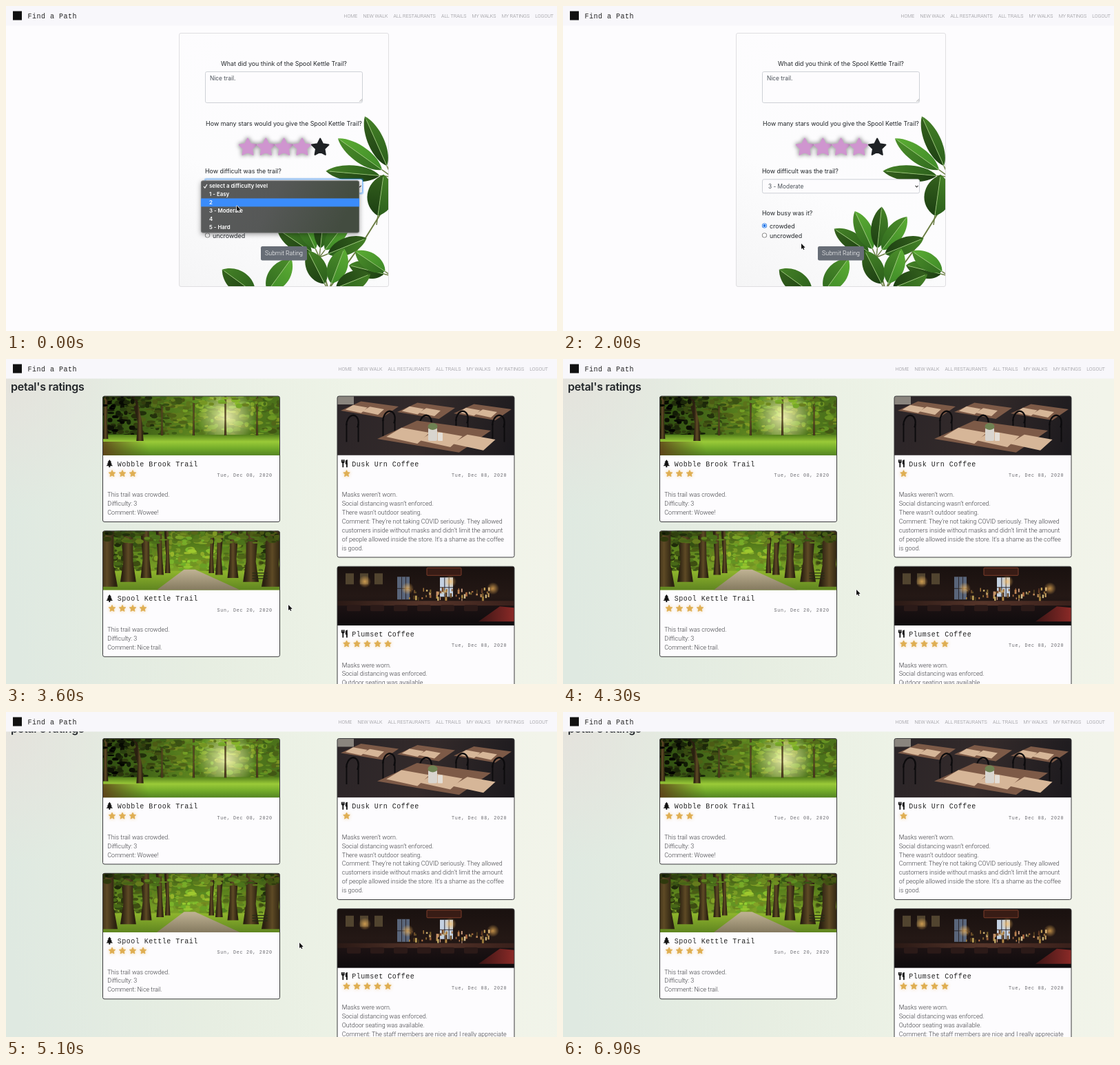
Animation of 800 by 472 pixels, one loop 7 s. Source, as an HTML page with a canvas:

```html
<!DOCTYPE html>
<html lang="en">
<head>
<meta charset="utf-8">
<title>Trail ratings</title>
<style>
html, body { margin: 0; width: 100%; height: 100%; overflow: hidden; background: #fdfcfe; }
canvas { display: block; width: 800px; height: 472px; }
</style>
</head>
<body>
<canvas id="stage"></canvas>
<script>
const W = 800, H = 472, LOOP = 7000, STEP = 100, TAU = Math.PI * 2;
const canvas = document.getElementById('stage');
const dpr = window.devicePixelRatio || 1;
canvas.width = W * dpr;
canvas.height = H * dpr;
const c = canvas.getContext('2d');

const PAPER = '#fdfcfe', INK = '#212529';
const UI = 'Inter, sans-serif', BODY = 'Roboto, sans-serif', MONO = '"Liberation Mono", monospace';
const TRAIL = 'Spool Kettle Trail';

// Times of the hard changes, in ms
const HOVER = 300, CLOSE = 1000, PICK = 1700, SUBMIT = 2700, LOADED = 3100, HIDE = 5700;

const cursorPath = [
  [0, 335, 290], [500, 336, 297], [1000, 336, 297], [1600, 293, 318], [1800, 293, 318],
  [2000, 346, 345], [2400, 402, 357], [3000, 402, 357], [3600, 410, 357], [4300, 426, 335]
];
const scrollPath = [[4500, 0], [4800, 15.5]];

// Interpolates rows of [time, ...values] with a soft ease
function along(keys, t) {
  const i = Math.max(0, keys.findLastIndex(k => k[0] <= t));
  const a = keys[i], b = keys[i + 1] || a;
  const u = Math.max(0, Math.min(1, (t - a[0]) / (b[0] - a[0] || 1))), e = u * u * (3 - 2 * u);
  return a.slice(1).map((v, k) => v + (b[k + 1] - v) * e);
}

function random(seed) {
  return () => (seed = (seed * 16807) % 2147483647) / 2147483647;
}

const mix = (a, b, u) => a + (b - a) * u;

function repeat(n, draw) {
  for (let i = 0; i < n; i++) draw(i, n > 1 ? i / (n - 1) : 0);
}

// ---- Drawing helpers ----

function text(str, x, y, font, color, align = 'left', spacing = 0) {
  c.font = font;
  c.fillStyle = color;
  c.textAlign = align;
  c.letterSpacing = spacing + 'px';
  c.fillText(str, x, y);
  c.letterSpacing = '0px';
}

function rect(x, y, w, h, fill) {
  c.fillStyle = fill;
  c.fillRect(x, y, w, h);
}

function box(x, y, w, h, r, fill, border) {
  c.beginPath();
  c.roundRect(x, y, w, h, r);
  if (fill) { c.fillStyle = fill; c.fill(); }
  if (border) { c.strokeStyle = border; c.lineWidth = 1; c.stroke(); }
}

function trace(pts) {
  c.beginPath();
  for (let i = 0; i < pts.length; i += 2) c.lineTo(pts[i], pts[i + 1]);
}

function poly(pts, fill) {
  trace(pts);
  c.fillStyle = fill;
  c.fill();
}

function line(pts, color, width) {
  trace(pts);
  c.strokeStyle = color;
  c.lineWidth = width;
  c.stroke();
}

function disc(x, y, rx, fill, ry = rx) {
  c.beginPath();
  c.ellipse(x, y, rx, ry, 0, 0, TAU);
  c.fillStyle = fill;
  c.fill();
}

function ramp(x0, y0, x1, y1, ...colors) {
  const g = c.createLinearGradient(x0, y0, x1, y1);
  colors.forEach((col, i) => g.addColorStop(i / (colors.length - 1), col));
  return g;
}

function glow(x, y, r, rgb, alpha) {
  const g = c.createRadialGradient(x, y, 0, x, y, r);
  g.addColorStop(0, `rgba(${rgb},${alpha})`);
  g.addColorStop(1, `rgba(${rgb},0)`);
  rect(x - r, y - r, 2 * r, 2 * r, g);
}

function star(x, y, r, color, shadow, blur = 0) {
  const pts = [];
  repeat(10, i => {
    const a = i * TAU / 10 - TAU / 4, d = i % 2 ? r * 0.5 : r;
    pts.push(x + d * Math.cos(a), y + d * Math.sin(a));
  });
  c.save();
  c.lineJoin = 'round';
  c.shadowColor = shadow || 'transparent';
  c.shadowBlur = blur * dpr;
  trace(pts);
  c.closePath();
  c.strokeStyle = c.fillStyle = color;
  c.lineWidth = r * 0.17;
  c.stroke();
  c.shadowColor = 'transparent';
  c.fill();
  c.restore();
}

function cursor(x, y) {
  c.save();
  c.translate(x, y);
  c.lineJoin = 'round';
  const arrow = [0, 0, 0, 8, 1.9, 6.4, 3.1, 9.1, 4.4, 8.5, 3.3, 5.9, 5.7, 5.7, 0, 0];
  line(arrow, '#fff', 1.3);
  poly(arrow, '#111');
  c.restore();
}

function navbar(right) {
  rect(0, 0, W, 28.5, '#f8f7fb');
  rect(10, 7.5, 13, 13, '#111');
  text('Find a Path', 31.5, 17.5, '10px ' + MONO, '#222', 'left', 0.5);
  const items = ['LOGOUT', 'MY RATINGS', 'MY WALKS', 'ALL TRAILS', 'ALL RESTAURANTS', 'NEW WALK', 'HOME'];
  for (const s of items) {
    text(s, right, 17, '300 7.05px ' + BODY, '#8a8a8e', 'right');
    right -= c.measureText(s).width + 8.2;
  }
}

// ---- Rating form ----

function leaf(x, y, angle, len, breadth, light) {
  c.save();
  c.translate(x, y);
  c.rotate(angle);
  for (const side of [-1, 1]) {
    const b = side * breadth * 0.68;
    c.beginPath();
    c.moveTo(0, 0);
    c.bezierCurveTo(len * 0.2, b, len * 0.75, b, len, 0);
    const l = 25 + light * 11 + side * 4;
    c.fillStyle = ramp(0, 0, len, 0, `hsl(106,55%,${l - 5}%)`, `hsl(100,54%,${l + 4}%)`);
    c.fill();
  }
  line([0, 0, len * 0.93, 0], '#9cc779', 0.8);
  c.restore();
}

// Leaves spread around one joint, angles in degrees
function fan(x, y, n, from, to, reach, breadth) {
  const gap = reach * 0.18;
  repeat(n, (i, u) => {
    const a = mix(from, to, u) * TAU / 360;
    line([x, y, x + gap * Math.cos(a), y + gap * Math.sin(a)], '#6d7f45', 1.5);
    leaf(x + gap * Math.cos(a), y + gap * Math.sin(a), a, reach - gap, breadth, i % 2);
  });
}

function plant() {
  line([545, 300, 520, 340, 468, 412, 455, 365], '#6d7f45', 2);
  fan(560, 248, 3, 185, 246, 96, 23);
  fan(538, 318, 1, 278, 278, 74, 38);
  fan(560, 392, 2, 194, 214, 64, 24);
  fan(455, 365, 5, 214, 338, 74, 24);
  fan(468, 414, 3, 243, 338, 66, 28);
  fan(372, 425, 2, 216, 306, 72, 30);
}

function radio(y, on) {
  disc(292.5, y, 3.6, on ? '#1a73e8' : '#767676');
  disc(292.5, y, 2.8, '#fff');
  if (on) disc(292.5, y, 2, '#1a73e8');
}

function menu(t) {
  const row = 11.85, active = t < HOVER ? 2 : 3;
  c.save();
  c.shadowColor = 'rgba(0,0,0,.4)';
  c.shadowBlur = 7 * dpr;
  c.shadowOffsetY = 2 * dpr;
  box(283, 253.5, 230, 76, 3, ramp(283, 253, 470, 350, '#5a5b5c', '#565857', '#434c40'));
  c.restore();
  box(283.3, 253.8, 229.4, 75.4, 3, null, 'rgba(150,150,150,.55)');
  rect(283, 255.7 + active * row, 230, 12, '#3b8cfb');
  const items = ['select a difficulty level', '1 - Easy', '2', '3 - Moderate', '4', '5 - Hard'];
  items.forEach((s, i) => text(s, 295, 264.4 + i * row, '600 7.85px ' + UI, '#fff'));
  line([287, 262, 288.8, 264.2, 292, 259], '#fff', 1.1);
}

function form(t) {
  rect(0, 0, W, H, PAPER);
  navbar(795);
  c.save();
  c.beginPath();
  c.roundRect(251.5, 39.5, 304, 368, 2.5);
  c.clip();
  rect(251, 39, 305, 369, ramp(251, 407, 420, 100, '#f5f5f6', '#fcfcfd', PAPER));
  plant();
  c.restore();
  box(251.5, 39.5, 304, 368, 2.5, null, '#dfdee1');

  const label = (s, x, y, align) => text(s, x, y, '8.89px ' + UI, INK, align);
  label(`What did you think of the ${TRAIL}?`, 403.5, 86.8, 'center');
  box(289.5, 95.5, 228, 45, 2.2, PAPER, '#ced1d6');
  text('Nice trail.', 296, 108.4, '8.4px ' + UI, '#495057');
  for (const d of [2, 4]) line([517 - d, 139, 517, 139 - d], '#888', 0.6);

  label(`How many stars would you give the ${TRAIL}?`, 403.5, 173.7, 'center');
  repeat(5, i => {
    const lit = i < 4;
    star(351 + i * 26.3, 205.5, 12.8, lit ? '#cf95cf' : '#1f2225', lit && 'rgba(0,0,0,.85)', 6);
  });

  label('How difficult was the trail?', 289, 243.4);
  const focus = t < PICK;
  if (focus) box(287.5, 249.8, 232, 24, 3.5, 'rgba(0,123,255,.25)');
  box(289.5, 251.8, 228, 20, 2.2, PAPER, focus ? '#80bdff' : '#ced1d6');
  text(t < CLOSE ? 'select a difficulty level' : '3 - Moderate', 298, 264.9, '8.3px ' + UI, '#495057');
  line([511.6, 260.8, 513.6, 263, 515.6, 260.8], '#333', 1.1);

  label('How busy was it?', 289, 304.4);
  ['crowded', 'uncrowded'].forEach((s, i) => {
    radio(319 + i * 14, i === 0 && t >= PICK);
    label(s, 300, 322.6 + i * 14);
  });
  box(370, 349, 67, 20.5, 2.2, '#676d76');
  text('Submit Rating', 403.5, 362.3, '300 8.89px ' + BODY, '#fff', 'center');

  if (t < CLOSE) menu(t);
}

// ---- Photos, each 257 x 86 ----

// Blobs of leaves, brighter towards a light at (lx, ly)
function foliage(seed, n, depth, lx, ly) {
  const rnd = random(seed);
  repeat(n, () => {
    const x = rnd() * 257, y = rnd() * depth, far = Math.hypot(x - lx, (y - ly) * 1.5);
    const l = Math.max(9, 47 - far * 0.24) + rnd() * 16 - 10;
    disc(x, y, 2 + rnd() * 5, `hsl(${mix(72, 88, rnd())},62%,${l}%)`, 1 + rnd() * 3);
  });
}

function trunk(x, w, ground, lean = 0) {
  poly([x - w / 2 + lean, 0, x + w / 2 + lean, 0, x + w * 0.4, ground * 0.6, x + w * 0.65, ground,
    x - w * 0.65, ground, x - w * 0.4, ground * 0.6],
    ramp(x - w / 2, 0, x + w / 2, 0, '#2a2010', '#5e4a25', '#2c2210'));
}

function park() {
  rect(0, 0, 257, 86, ramp(0, 0, 257, 0, '#2c4a10', '#5c8420', '#4a701a'));
  foliage(11, 420, 58, 180, 28);
  glow(180, 30, 42, '255,250,190', 0.85);
  rect(0, 56, 257, 30, ramp(0, 56, 0, 86, '#55801c', '#9aca38', '#73ab2a', '#548422'));
  rect(0, 66, 257, 20, ramp(0, 86, 60, 60, '#5e4118', 'rgba(90,90,30,0)'));
  repeat(4, i => trunk(86 + i * 46, 2.5, 57));
  trunk(54, 8, 65, -9);
  trunk(4, 6, 62);
  foliage(5, 70, 15, 180, 28);
}

function avenue() {
  rect(0, 0, 257, 86, ramp(0, 0, 0, 60, '#3f6614', '#7fa428'));
  foliage(29, 420, 58, 130, 40);
  rect(0, 58, 257, 28, ramp(0, 58, 0, 86, '#8fb52d', '#5f8420'));
  poly([118, 56, 134, 56, 200, 86, 78, 86], ramp(0, 56, 0, 86, '#c0b394', '#84795f'));
  repeat(5, i => {
    const near = 0.1 + 0.9 * (i / 4) ** 1.5;
    for (const side of [-1, 1]) trunk(126 + side * (22 + 98 * near), 4 + 20 * near, 59 + 22 * near, side * 2);
  });
  foliage(17, 150, 17, 130, 40);
  repeat(3, i => line([217, 61 + i * 4, 239, 61 + i * 4], '#262c14', 1.2));
}

// A slanted table top with place mats
function table(x, y, w, mats) {
  const slab = (x, y, w, h, fill) =>
    poly([x, y, x + w * 0.35, y - h, x + w, y - h * 0.45, x + w * 0.72, y + h * 0.75], fill);
  slab(x, y, w, w * 0.16, '#7d5a47');
  repeat(mats, i => slab(x + w * (0.08 + i * 0.29), y + w * (i - 0.6) * 0.03, w * 0.38, w * 0.08, '#d6b698'));
}

function chair(x, y, s) {
  c.beginPath();
  c.ellipse(x, y, 9 * s, 13 * s, 0.2, Math.PI * 0.9, Math.PI * 2.1);
  c.strokeStyle = '#0c0b0d';
  c.lineWidth = 2.4 * s;
  c.stroke();
  for (const side of [-9, 9]) line([x + side * s, y, x + side * s, y + 28 * s], '#0c0b0d', 2 * s);
}

function cafe() {
  rect(0, 0, 257, 86, ramp(0, 0, 257, 86, '#2b2528', '#332a2a', '#1b191d'));
  rect(0, 0, 24, 12, '#8a857e');
  repeat(3, i => table(5 + i * 82, 21 + i * 2, 84, 2));
  repeat(5, i => chair(22 + i * 53, 40 - (i % 2) * 6, 0.95));
  table(58, 62, 165, 3);
  box(132, 46, 13, 19, 2, '#d9d5cf');
  disc(138.5, 44, 7, '#6f8253', 5);
  box(146, 53, 7, 12, 1, '#e4ded6');
}

function pane(x, y, w, h, fill) {
  rect(x, y, w, h, fill);
  repeat(2, i => rect(x + w * (i + 1) / 3, y, 1, h, '#2b262c'));
  rect(x, y + h / 2, w, 1, '#2b262c');
}

function bar() {
  const rnd = random(7);
  rect(0, 0, 257, 86, ramp(0, 0, 0, 86, '#19110f', '#241815', '#0f0b0d'));
  repeat(3, i => rect(12 + i * 21, 10, 12, 16, '#51442f'));
  pane(87, 15, 18, 33, '#59657a');
  pane(149, 16, 19, 28, '#c4d1e1');
  box(130, 2, 50, 11, 1, '#381c15', '#7c3d2a');
  repeat(60, i => rect(104 + rnd() * 120, 30 + rnd() * 16, 1 + rnd() * 2, 2 + rnd() * 5,
    `hsl(${20 + rnd() * 25},45%,${20 + rnd() * 50}%)`));
  repeat(4, i => {
    glow(40 + i * 62, 22 + (i % 2) * 10, 9, '255,190,93', 0.7);
  });
  rect(0, 50, 257, 7, ramp(0, 0, 257, 0, '#2a1915', '#56352a', '#39201b'));
  rect(0, 57, 257, 29, ramp(0, 57, 0, 86, '#1c1213', '#0e0b0d'));
  repeat(6, i => box(14 + i * 34, 56, 20, 9, 2, '#2b1a18'));
  poly([205, 80, 236, 58, 257, 60, 257, 80], ramp(205, 0, 257, 0, '#3a1515', '#8b2a27'));
}

// ---- Ratings page ----

function treeIcon(x, y) {
  repeat(3, i => poly([x + 4, y + i * 2, x + 6.8 + i, y + 3.6 + i * 2.7, x + 1.2 - i, y + 3.6 + i * 2.7], '#111'));
  rect(x + 3, y + 8, 2, 3, '#111');
}

function forkIcon(x, y) {
  box(x, y, 5, 5, [0, 0, 2.5, 2.5], '#111');
  for (const d of [1.3, 3.2]) rect(x + d, y, 0.5, 2.7, PAPER);
  rect(x + 1.6, y + 4, 1.8, 7, '#111');
  box(x + 6, y, 3, 6.8, [3, 0, 0, 1], '#111');
  rect(x + 7.2, y + 5, 1.8, 6, '#111');
}

const columns = [
  { x: 140.5, icon: treeIcon, cards: [
    { photo: park, name: 'Wobble Brook Trail', stars: 3, date: 'Tue, Dec 08, 2020',
      lines: ['This trail was crowded.', 'Difficulty: 3', 'Comment: Wowee!'] },
    { photo: avenue, name: TRAIL, stars: 4, date: 'Sun, Dec 20, 2020',
      lines: ['This trail was crowded.', 'Difficulty: 3', 'Comment: Nice trail.'] }
  ] },
  { x: 481, icon: forkIcon, cards: [
    { photo: cafe, name: 'Dusk Urn Coffee', stars: 1, date: 'Tue, Dec 08, 2020',
      lines: ['Masks weren’t worn.', 'Social distancing wasn’t enforced.', 'There wasn’t outdoor seating.',
        'Comment: They’re not taking COVID seriously. They allowed',
        'customers inside without masks and didn’t limit the amount',
        'of people allowed inside the store. It’s a shame as the coffee', 'is good.'] },
    { photo: bar, name: 'Plumset Coffee', stars: 5, date: 'Tue, Dec 08, 2020',
      lines: ['Masks were worn.', 'Social distancing was enforced.', 'Outdoor seating was available.',
        'Comment: The staff members are nice and I really appreciate'] }
  ] }
];
const LEADING = 12.87;
const cardHeight = d => 143.9 + d.lines.length * LEADING;

function card(d, icon, x, y) {
  const h = cardHeight(d);
  c.save();
  c.translate(x, y);
  box(0, 0, 257, h, 2.5, PAPER);
  c.save();
  c.beginPath();
  c.roundRect(0, 0, 257, 85.7, [2.5, 2.5, 0, 0]);
  c.clip();
  d.photo();
  c.restore();
  box(0, 0, 257, h, 2.5, null, '#3b3b3d');
  icon(5.8, 92.3);
  text(d.name, 21.3, 101.5, '10px ' + MONO, '#222', 'left', 0.5);
  repeat(d.stars, i => star(13.5 + i * 15, 112.6, 5, '#dfae52', 'rgba(226,160,50,.8)', 4));
  text(d.date, 166, 117, '6.7px ' + MONO, '#6b6b70', 'left', 0.7);
  d.lines.forEach((s, i) => text(s, 6.8, 146.3 + i * LEADING, '300 8.96px ' + BODY, '#3a3b3f'));
  c.restore();
}

function heading(y) {
  text("petal's ratings", 7, y, '600 16px ' + UI, INK, 'left', -0.25);
}

function loading() {
  rect(0, 0, W, H, PAPER);
  rect(0, 28.5, W, 25, ramp(0, 0, W, 0, '#c3c7c2', '#cbcfc6', '#ecece0', '#dde7dc', '#c5d5c6'));
  heading(45.5);
  navbar(795);
}

function ratings(t) {
  const [scroll] = along(scrollPath, t);
  rect(0, 0, W, H, ramp(0, 300, W, 180, '#dfe9e1', '#e7eee2', '#eef3e7', '#f2f4ea'));
  glow(0, 30, 190, '229,226,220', 0.9);
  heading(45.5 - scroll);
  for (const { x, icon, cards } of columns) {
    let y = 54 - scroll;
    for (const d of cards) {
      card(d, icon, x, y);
      y += cardHeight(d) + 13.3;
    }
  }
  navbar(787);
}

function draw(now) {
  const t = Math.floor((now % LOOP) / STEP) * STEP;
  c.setTransform(dpr, 0, 0, dpr, 0, 0);
  if (t < SUBMIT) form(t);
  else if (t < LOADED) loading();
  else ratings(t);
  if (t < HIDE) cursor(...along(cursorPath, t));
}

const start = performance.now();
function tick() {
  draw(performance.now() - start);
  requestAnimationFrame(tick);
}
tick();
</script>
</body>
</html>
```
